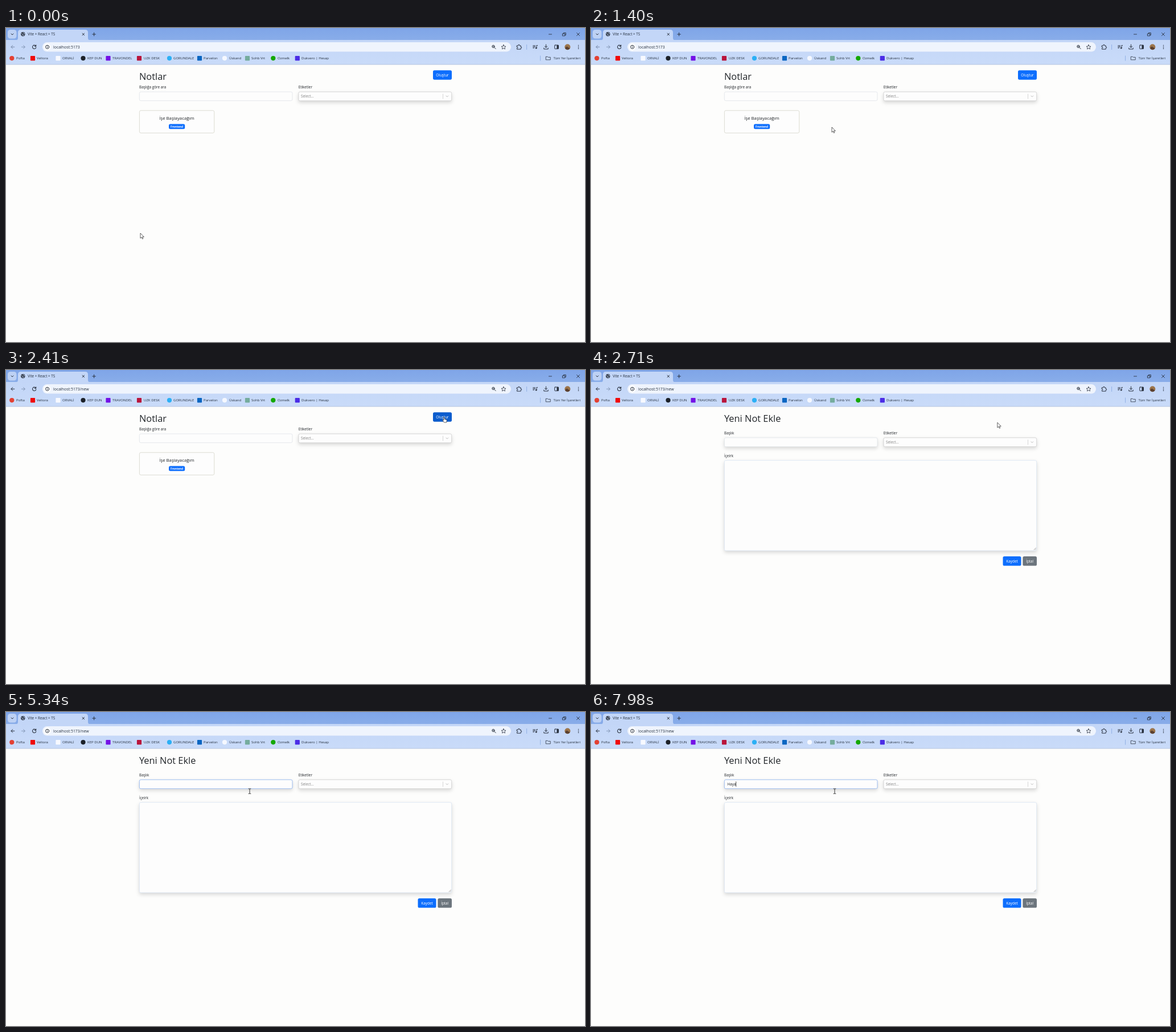
Recreate the animation shown at these times as an HTML page. Size 1017x551 px, loop 8000 ms.

```html
<!DOCTYPE html>
<html lang="tr">
<head>
<meta charset="utf-8">
<title>Notlar</title>
<style>
  html, body { margin: 0; width: 100%; height: 100%; overflow: hidden; background: #fdfdfc; }
  svg { display: block; width: 1017px; height: 551px; }
  text { font-family: "Open Sans", "Noto Sans", sans-serif; font-size: 6.4px; fill: #212529; white-space: pre; }
  .ui { font-size: 6.05px; fill: #25303f; }
  .h1 { font-size: 16.4px; font-weight: 500; }
  .hint { fill: #808080; }
  .on { fill: #fff; }
  .mid { text-anchor: middle; }
  .badge { font-size: 4.8px; font-weight: 700; }
  .line { fill: none; stroke: #2b3340; stroke-width: 1; stroke-linecap: round; stroke-linejoin: round; }
  .dark { fill: #2b3340; }
  .shadow { filter: drop-shadow(0 3.4px 3px rgba(0, 0, 0, .15)); }
</style>
</head>
<body>
<svg viewBox="0 0 1017 551">
  <defs>
    <linearGradient id="strip" x2="0" y2="1">
      <stop offset="0" stop-color="#7fa5e8"/><stop offset="1" stop-color="#89ade9"/>
    </linearGradient>
    <linearGradient id="bar" x2="0" y2="1">
      <stop offset="0" stop-color="#c3d6f7"/><stop offset="1" stop-color="#c9dbf9"/>
    </linearGradient>
  </defs>
  <rect width="1017" height="551" fill="#fdfdfc"/>

  <g id="browser">
    <rect width="1017" height="22" fill="url(#strip)"/>
    <rect y="21" width="1017" height="43" fill="url(#bar)"/>
    <rect y="63.5" width="1017" height="1" fill="#b3c4e0"/>
    <rect x="3" y="3" width="15.5" height="15.5" rx="4.5" fill="#bdd1f4"/>
    <path class="line" d="M9 10l2 2 2-2"/>
    <path d="M17 21.5q4 0 4-4V8q0-5 5-5H139q5 0 5 5v9.500q0 4 4 4z" fill="#c3d6f7"/>

    <circle class="dark" cx="29.800" cy="10.800" r="3.700"/>
    <path d="M27 9.500l2.500 1.500-1 2M30 7.800l1 1.500 1.800.2M30.500 13.500l1-2" class="line" style="stroke:#c3d6f7;stroke-width:.9"/>
    <path class="line" d="M134 9.200l3.600 3.600m0-3.600l-3.600 3.600M151.800 11h5.600m-2.800-2.800v5.600"/>
    <path class="line" d="M953.500 11h5M977.800 10h4v3.800h-4zM979.300 10v-1.600h4v4h-1.500M1002.500 8.500l5 5m0-5l-5 5" style="stroke-width:.9"/>

    <path id="back" class="line" d="M14.800 33.300H9m2.700-2.800L9 33.300l2.700 2.800"/>
    <path class="line" d="M27.500 33.300h5.800m-2.700-2.800l2.700 2.800-2.700 2.800" style="stroke:#8396b6"/>
    <path class="line" d="M52.300 31.500a3.200 3.200 0 1 0 .5 2.600M52.700 29.800v2.300h-2.300" style="stroke-width:1.100"/>
    <rect x="64" y="25" width="823" height="16.600" rx="8.300" fill="#eff4fd"/>
    <circle cx="72.600" cy="33.300" r="6.200" fill="#fdfeff"/>
    <circle class="line" cx="72.600" cy="33.300" r="3.100"/>
    <path class="line" d="M72.600 33v1.700M72.600 31.500v.1" style="stroke-width:.9"/>
    <circle class="line" cx="856" cy="32.400" r="2.200"/>
    <path class="line" d="M857.800 34.200l2.400 2.400M855 32.400h2"/>
    <path class="line" d="M874 29.400l1.200 2.600 2.800.3-2.100 1.900.6 2.800-2.500-1.500-2.500 1.500.6-2.800-2.100-1.900 2.800-.3z" style="stroke-width:.8"/>
    <path class="line" d="M897.500 31h2.200q-.3-1.800 1.200-1.800t1.200 1.800h2.100v2.200q1.500-.2 1.500 1t-1.500 1v2h-6.700v-2q1.500-.2 1.500-1t-1.500-1z"/>
    <path d="M914.600 29v9M938.600 48.500v9" stroke="#91b0e4"/>
    <path class="line" d="M925.700 31h4m-4 2h4m-4 2h2M932 35.200v-4.700h1.500"/>
    <circle class="dark" cx="931.200" cy="35.300" r="1.300"/>
    <path class="line" d="M948.500 29v5m-2.300-2l2.300 2.300 2.300-2.300M944.800 35v2h7.400v-2"/>
    <rect class="line" x="963.700" y="30" width="6.800" height="6.600" rx=".7"/>
    <rect class="dark" x="967.400" y="30" width="3.100" height="6.600"/>
    <circle cx="986.300" cy="33.300" r="5" fill="#9c754b"/>
    <path d="M982 35.500q2-4 4.300-2.500t4.300 2.700a5 5 0 0 1-8.600 0z" fill="#5b4030"/>
    <path class="line" d="M1005.500 30.500v.1m0 2.700v.1m0 2.700v.1" style="stroke-width:1.500"/>
    <path class="line" d="M948.600 50.300h2.600l1 1h4v4.500h-7.600z" style="stroke-width:.8"/>
    <text class="ui" x="38" y="13" style="font-size:6.350px">Vite + React + TS</text>
    <text id="url" class="ui" x="83" y="35.900" style="font-size:6.950px"></text>
    <text class="ui" x="1009" y="55.200" text-anchor="end" style="font-size:5.850px">Tüm Yer İşaretleri</text>
  </g>

  <g id="list"></g>
  <g id="form"></g>

  <g id="pointer">
    <path id="arrow" d="M0 0v9l2.100-1.900 1.400 3.100 1.400-.6-1.400-3h2.900z" fill="#fff" stroke="#222" stroke-width=".7"/>
    <path id="hand" d="M-.9 0q.9-.9 1.700 0v3.300l3 .7q1.100.4 1 1.500l-.6 3.500h-4.200l-2.700-3.700q.2-1.200 1.800-.1z" fill="#fff" stroke="#222" stroke-width=".7"/>
    <path id="beam" class="line" d="M-1.900-4.300H-.5L0-3.800l.5-.5h1.400M0-3.800v7.600M-1.900 4.300H-.5L0 3.800l.5.5h1.400" style="stroke-width:.9;stroke:#222"/>
  </g>
</svg>

<script>
const LOOP = 8000;
const BLUE = '#0d6efd';
const $ = id => document.getElementById(id);

function add(parent, tag, attrs, content = '') {
  const el = document.createElementNS('http://www.w3.org/2000/svg', tag);
  for (const key in attrs) el.setAttribute(key, attrs[key]);
  el.textContent = content;
  return parent.appendChild(el);
}
const label = (parent, x, y, content, cls = '') => add(parent, 'text', { x, y, class: cls }, content);
const box = (parent, x, y, width, height, stroke, cls = '') =>
  add(parent, 'rect', { x, y, width, height, rx: 2.5, fill: '#fdfdfd', stroke, 'stroke-width': .8, class: cls });

function button(parent, x, y, width, content, fill) {
  const rect = add(parent, 'rect', { x, y, width, height: 16.5, rx: 2.6, fill });
  label(parent, x + width / 2, y + 11.1, content, 'mid on');
  return rect;
}
function select(parent, y) {
  box(parent, 513.9, y, 268.8, 15.8, '#cccccc', 'shadow');
  label(parent, 518, y + 10.3, 'Select...', 'hint');
  add(parent, 'path', { d: `M767.5 ${y + 3.5}v9`, stroke: '#ccc', 'stroke-width': .8 });
  add(parent, 'path', { d: `M773 ${y + 7}l1.800 1.800 1.800-1.800`, class: 'line', style: 'stroke:#b9b9b9' });
}

// Bookmarks: icon centre, text start, name, colour, round
[
  [10.3, 18, 'Pofta', '#e34133', 1],
  [47, 54, 'Veltora', '#f00a0a', 0],
  [91.5, 99, 'ORVALİ', '#f7f9ff', 0],
  [135.5, 143, 'KEP DUN', '#1c2128', 1],
  [179.5, 187, 'TRAVONDEL', '#7412e6', 0],
  [234, 242, 'UZK DESK', '#b9153c', 0],
  [287, 294, 'GORUNDALE', '#2cb0f5', 1],
  [340, 347, 'Parvelon', '#0a66c2', 0],
  [384, 392, 'Üskand', '#f5f8ff', 1],
  [424, 431, 'Sohb Vrt', '#75ac9d', 0],
  [469.3, 477, 'Ozmelk', '#14a800', 1],
  [511.8, 519, 'Dukvero | Hesap', '#4b2ce6', 0]
].forEach(([cx, x, name, fill, round]) => {
  add($('browser'), 'rect', { x: cx - 4.1, y: 49, width: 8.2, height: 8.2, rx: round ? 4.1 : 1, fill });
  label($('browser'), x, 55.2, name, 'ui');
});

const list = $('list');
label(list, 234, 91, 'Notlar', 'h1');
const create = button(list, 750, 74.2, 33, 'Oluştur', BLUE);
label(list, 234, 105.9, 'Başlığa göre ara');
label(list, 513.7, 105.9, 'Etiketler');
box(list, 234.3, 112, 268.7, 15.6, '#dfe3e7');
select(list, 112);
box(list, 234.4, 144.8, 131.4, 39.4, '#d4d4c8');
add(list, 'text', { x: 300, y: 161.4, class: 'mid', style: 'font-size:7.8px' }, 'İşe Başlayacağım');
add(list, 'rect', { x: 286, y: 168.4, width: 28.2, height: 8.8, rx: 2.5, fill: BLUE });
label(list, 300.1, 174.5, 'Frontend', 'mid on badge');

const form = $('form');
label(form, 234, 91, 'Yeni Not Ekle', 'h1');
label(form, 234, 112.9, 'Başlık');
label(form, 513.7, 112.9, 'Etiketler');
const field = box(form, 234.3, 118.8, 268.7, 15.8, '#dee2e6', 'shadow');
select(form, 118.8);
const typed = label(form, 239.5, 129.1, '');
const caret = add(form, 'rect', { y: 122, width: .8, height: 9, fill: '#222' });
label(form, 234, 152.6, 'İçeirk');
box(form, 234.3, 158.6, 548.4, 158.4, '#d9e4f2', 'shadow');
add(form, 'path', { d: 'M778 315.500l3.500-3.500M780 315.500l1.500-1.500', class: 'line', style: 'stroke:#777;stroke-width:.6' });
button(form, 723.5, 327, 32, 'Kaydet', BLUE);
button(form, 758.4, 327, 24.6, 'İptal', '#6c757d');

const HOVER = 2170, PRESS = 2380, OPEN = 2460, FIELD = 3070, FOCUS = 3270, BLINK = 530;
const path = [
  [0, 236, 360], [470, 448, 239], [840, 440, 215], [1400, 423, 174], [1650, 428, 172],
  [2220, 769.5, 83], [2560, 769.5, 83], [3150, 428, 139], [LOOP, 428, 139]
];
const keys = [[5760, 'H'], [6350, 'a'], [6900, 'y'], [7600, 'a']];

const ramp = (t, start, length) => Math.min(1, Math.max(0, (t - start) / length));
const mix = (a, b, k) => `rgb(${a.map((v, i) => Math.round(v + (b[i] - v) * k))})`;
const show = (el, on) => { el.style.display = on ? '' : 'none'; };

function pointerAt(t) {
  const i = path.findIndex(step => step[0] > t);
  const [t0, x0, y0] = path[i - 1], [t1, x1, y1] = path[i];
  const k = (t - t0) / (t1 - t0), ease = k * k * (3 - 2 * k);
  return [x0 + (x1 - x0) * ease, y0 + (y1 - y0) * ease];
}

function render(t) {
  const opened = t >= OPEN;
  show(list, !opened);
  show(form, opened);
  $('url').textContent = 'localhost:5173' + (t >= PRESS ? '/new' : '');
  $('back').style.stroke = t >= PRESS ? '#2b3340' : '#7789a8';
  create.setAttribute('fill', mix([13, 110, 253], [11, 92, 205], ramp(t, HOVER, 150)));

  const [x, y] = pointerAt(t);
  $('pointer').setAttribute('transform', `translate(${x} ${y})`);
  const hand = t >= HOVER && !opened, beam = t >= FIELD;
  show($('hand'), hand);
  show($('beam'), beam);
  show($('arrow'), !hand && !beam);

  field.setAttribute('stroke', mix([222, 226, 230], [134, 172, 236], ramp(t, FOCUS, 150)));
  const pressed = keys.filter(key => key[0] <= t);
  typed.textContent = pressed.map(key => key[1]).join('');
  const since = t - (pressed.length ? pressed[pressed.length - 1][0] : FOCUS);
  const width = pressed.length && opened ? typed.getComputedTextLength() : 0;
  caret.setAttribute('x', 239.3 + width);
  show(caret, since >= 0 && Math.floor(since / BLINK) % 2 === 0);
}

const start = performance.now();
function tick() {
  render((performance.now() - start) % LOOP);
  requestAnimationFrame(tick);
}
tick();
</script>
</body>
</html>
```
